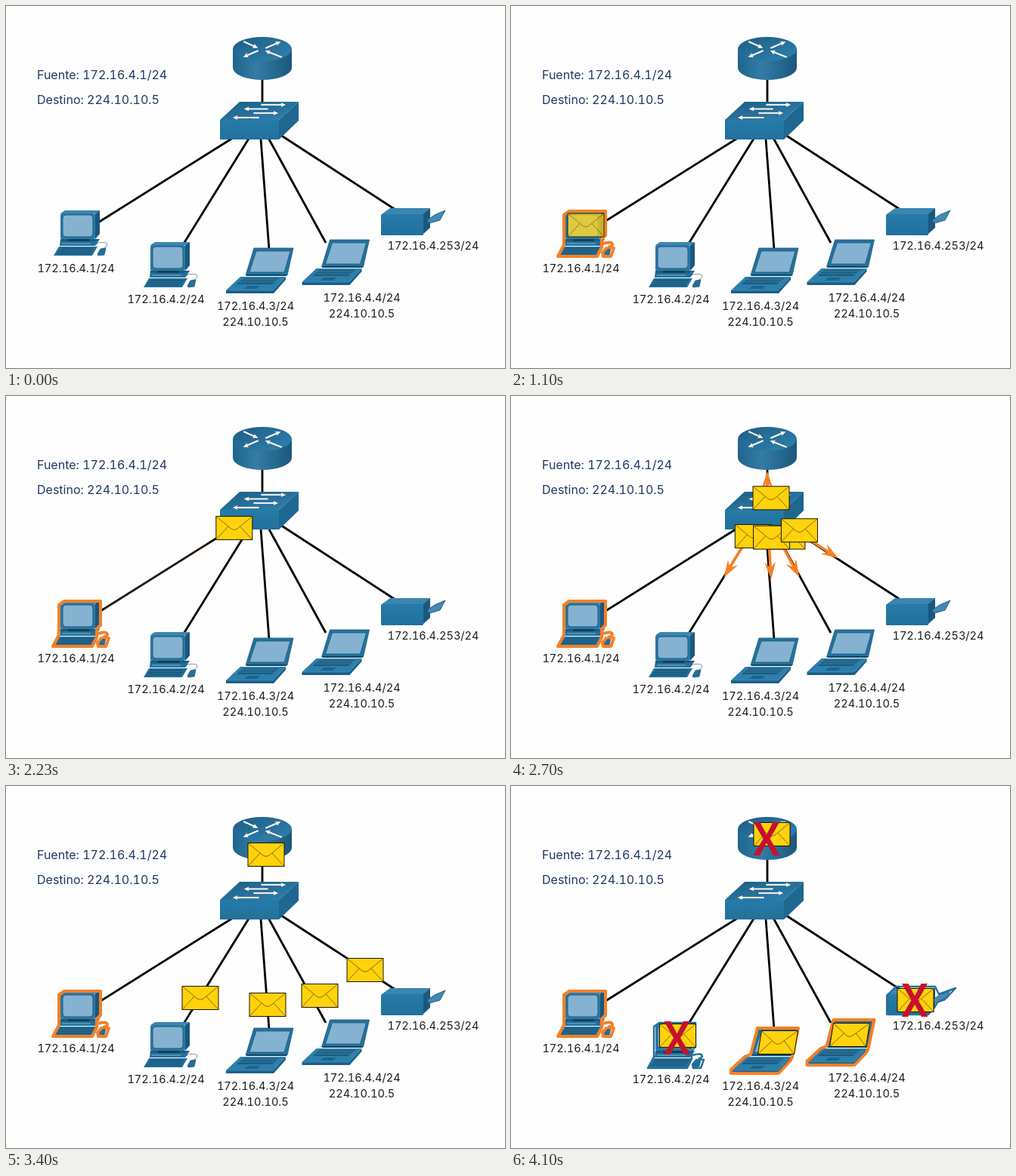
Animation, 660 px wide and 480 px high, one loop 4800 ms. Source, as an HTML page:

```html
<!DOCTYPE html>
<html lang="es">
<head>
<meta charset="utf-8">
<style>
html, body { margin: 0; width: 100%; height: 100%; overflow: hidden; background: #fefefe; }
svg { display: block; }
text { font: 14.6px Inter, Roboto, sans-serif; font-variant-numeric: tabular-nums; fill: #1c1c1c; text-anchor: middle; }
.title { font-size: 16px; fill: #1f3864; text-anchor: start; }
.glow { fill: none; stroke: #f58026; stroke-width: 4; stroke-linejoin: round; }
.blue { fill: none; stroke: #236f99; stroke-width: 2.4; stroke-linejoin: round; }
</style>
</head>
<body>
<svg width="660" height="480" viewBox="0 0 660 480">
<defs>
  <linearGradient id="side"><stop offset="0" stop-color="#1f658e"/><stop offset=".4" stop-color="#347ca5"/><stop offset="1" stop-color="#1b587c"/></linearGradient>
  <linearGradient id="top" x1="0" y1="0" x2="1" y2="1"><stop offset="0" stop-color="#1c5d84"/><stop offset="1" stop-color="#3083b0"/></linearGradient>
  <linearGradient id="face" x1="0" y1="0" x2="0" y2="1"><stop offset="0" stop-color="#267ba8"/><stop offset="1" stop-color="#22719c"/></linearGradient>

  <g id="pc">
    <path d="M72 309H124L118 318H71Z" fill="#1c5a80"/>
    <path d="M72 275L78 271H124L118 275Z" fill="#3b87b0"/>
    <path d="M118 275L124 271V302L118 309Z" fill="#1a587d"/>
    <rect x="72" y="275" width="46" height="34" rx="2" fill="#2a7aa6"/>
    <rect x="75" y="277" width="40" height="29" rx="4" fill="#86b2d1" stroke="#1c587c"/>
    <path d="M82 309H110V312H82Z" fill="#143f5a"/>
    <path d="M72 312H117L121 309V315L117 318H72Z" fill="#236f99"/>
    <path d="M74 315H112" stroke="#7fb0cc"/>
    <path d="M70 319H121L114 331H63Z" fill="#22709a"/>
    <path d="M71 322H116M69 325H114M67 328H112" stroke="#15496a"/>
    <path d="M121 314Q135 312 134 317Q133 320 128 322" fill="none" stroke="#3d4a52" stroke-width=".6"/>
    <path d="M121 329L125 322L132 321L130 330L122 331Z" fill="#236f99" stroke="#184f70" stroke-width=".7"/>
  </g>
  <g id="pcLine">
    <path d="M70 277L77 272H125V304L120 309V320L114 332H62L70 317Z"/>
    <path d="M121 315Q134 311 134 317L129 320L136 321L132 332H122L121 327L127 320"/>
  </g>

  <g id="laptop">
    <path d="M328 321H380L372 357H317Z" fill="#23729d" stroke="#195a80" stroke-width=".8"/>
    <path d="M331 325H376L368 353H322Z" fill="#86b2d1" stroke="#1c587c" stroke-width=".8"/>
    <path d="M310 359H370L353 377H291Z" fill="#2b7fab"/>
    <path d="M291 377H353L370 359V363L354 381H291Z" fill="#1b5f87"/>
    <path d="M314 361H361L352 369H305Z" fill="#1b5b80"/>
    <path d="M312 363H359M309 366H356M292 377H353L369 360" fill="none" stroke="#4a90b6" stroke-width=".7"/>
    <path d="M320 371H336L332 375H315Z" fill="#1d638b"/>
    <path d="M318 357H371" stroke="#134663" stroke-width="2"/>
  </g>
  <path id="laptopLine" d="M326 321H380L372 359L370 364L354 381H291V376L309 359L317 356Z"/>

  <g id="printer">
    <path d="M497 276L508 268H561L551 276Z" fill="#3986b0"/>
    <path d="M551 276L561 268V294L551 303Z" fill="#1a587d"/>
    <rect x="496" y="276" width="56" height="28" rx="1.5" fill="url(#face)"/>
    <path d="M557 284L567 277L581 271L574 284L560 288Z" fill="#4389b1" stroke="#1f648b"/>
  </g>
  <path id="printerLine" d="M498 277L509 266H561L566 276L588 268L576 281L564 287L560 294L552 303H498Z"/>

  <g id="mail">
    <rect x="-24" y="-15.5" width="48" height="31" fill="#ffd20c" stroke="#1b1500"/>
    <path d="M-24 -15.5L-4 1Q0 4 4 1L24 -15.5M-24 15.5L-8 -2M24 15.5L8 -2" fill="none" stroke="#6b5800" stroke-width=".8"/>
  </g>
  <path id="cross" d="M-17 -22H-8.5L0 -5.5L8.5 -22H17L4.5 0L17.5 22H9L0 5.5L-9 22H-17.5L-4.5 0Z" fill="#c8102e"/>
</defs>

<path d="M339 96V129M300 175L122 287M321 176L235 315M337 176L348 323M347 175L423 314M363 171L515 270" stroke="#000" stroke-width="2.8"/>

<path d="M300 57V82A39 16 0 0 0 378 82V57Z" fill="url(#side)"/>
<ellipse cx="339" cy="57" rx="39" ry="16" fill="url(#top)"/>
<path d="M283 151L309 127H387L361 151Z" fill="url(#top)"/>
<path d="M361 151L387 127V152L361 177Z" fill="#1e6790"/>
<path d="M283 151H361V177H283Z" fill="url(#face)"/>
<g id="signs" fill="#fff" stroke="#174d6e" stroke-width=".5"></g>

<use href="#pc"/>
<use href="#pc" x="119" y="42"/>
<use href="#laptop"/>
<use href="#laptop" x="100.5" y="-11"/>
<use href="#printer"/>
<use id="pcGlow" class="glow" href="#pcLine"/>
<g id="blue" class="blue">
  <use href="#pcLine" x="119" y="42"/>
  <use href="#printerLine"/>
</g>
<g id="lapGlow" class="glow">
  <use href="#laptopLine"/>
  <use href="#laptopLine" x="100.5" y="-11"/>
</g>

<g id="arrows"></g>
<g id="mails"></g>
<g id="crosses">
  <use href="#cross" x="338" y="70"/>
  <use href="#cross" x="219.5" y="334"/>
  <use href="#cross" x="534" y="284"/>
</g>

<text class="title" x="41" y="97">Fuente: 172.16.4.1/24</text>
<text class="title" x="41" y="130">Destino: 224.10.10.5</text>
<text x="92.5" y="353">172.16.4.1/24</text>
<text x="211.5" y="394">172.16.4.2/24</text>
<text x="330" y="403">172.16.4.3/24</text>
<text x="330" y="424">224.10.10.5</text>
<text x="470.5" y="392">172.16.4.4/24</text>
<text x="470.5" y="413">224.10.10.5</text>
<text x="565" y="323">172.16.4.253/24</text>
</svg>

<script>
const LOOP = 4800, HUB = [344, 154];
const $ = id => document.getElementById(id);
const clamp = v => Math.max(0, Math.min(1, v));
const mix = (a, b, k) => a.map((v, i) => v + (b[i] - v) * k);

function add(parent, tag, attrs = {}) {
  const el = document.createElementNS('http://www.w3.org/2000/svg', tag);
  for (const k in attrs) el.setAttribute(k, attrs[k]);
  return parent.appendChild(el);
}

// Arrow outline from a to b: shaft width w, head length h, half width s, notch n
function arrowPath(a, b, w, h, s, n) {
  const dx = b[0] - a[0], dy = b[1] - a[1], len = Math.hypot(dx, dy) || 1;
  const k = Math.min(1, len / h), c = dx / len, d = dy / len;
  const pts = [[0, w / 2], [len - n * k, w / 2], [len - h * k, s * k], [len, 0],
               [len - h * k, -s * k], [len - n * k, -w / 2], [0, -w / 2]];
  return 'M' + pts.map(([x, y]) => `${a[0] + x * c - y * d} ${a[1] + x * d + y * c}`).join('L') + 'Z';
}

for (const [x, y, u, v] of [
  [314, 47, 334, 56], [343, 56, 364, 47], [334, 59, 313, 68], [365, 68, 342, 59],
  [337, 131, 371, 131], [347, 136.5, 314, 136.5], [327, 142, 361, 142], [335, 148, 299, 148]
]) add($('signs'), 'path', { d: arrowPath([x, y], [u, v], 2.6, 8, 3.6, 7) });

// from/to: arrow ends; a, b, c: envelope stops; max: how far the arrow may grow
const routes = [
  { from: [339, 127], to: [339, 67], a: [344, 120], b: [344, 91], c: [345, 64], max: .65 },
  { from: [319, 178], to: [237, 315], a: [301, 212], b: [257, 281], c: [220.5, 331] },
  { from: [348, 178], to: [421, 314], a: [382, 215], b: [415, 278], c: [448, 330], skew: -9 },
  { from: [340, 177], to: [349, 322], a: [345, 215], b: [346, 290], c: [353, 340], skew: -9 },
  { from: [366, 172], to: [513, 267], a: [412, 198], b: [475, 244], c: [535, 284] }
];
const first = { from: [130, 282], to: [268, 195] };
for (const r of [first, ...routes]) {
  r.arrow = add($('arrows'), 'path');
  r.mail = add($('mails'), 'use', { href: '#mail' });
}

// Grows to u; fading turns pale first, then transparent
function drawArrow(r, u, fade) {
  const pale = clamp(fade * 2), rgb = mix([245, 128, 38], [250, 187, 143], pale);
  r.arrow.setAttribute('d', arrowPath(r.from, mix(r.from, r.to, u), 3.6, 23, 7.5, 17));
  r.arrow.setAttribute('fill', `rgb(${rgb.map(Math.round)})`);
  r.arrow.setAttribute('opacity', u > 0 ? clamp(2 - 2 * fade) : 0);
}

function drawMail(r, [x, y], opacity, skew = 0) {
  r.mail.setAttribute('transform', `translate(${x} ${y}) skewX(${skew})`);
  r.mail.setAttribute('opacity', opacity);
}

function draw(t) {
  const phase = (a, b) => clamp((t - a) / (b - a));
  const show = phase(730, 1230), send = phase(1260, 1760), enter = phase(1800, 2260);
  const split = phase(2330, 2830), run = phase(2900, 3400), land = phase(3460, 3960);
  const verdict = phase(3970, 4090), settle = clamp(land * 2 - 1);
  const arrive = 1 - (1 - land) ** 2.4;

  $('pcGlow').setAttribute('opacity', clamp(show * 1.35));
  $('blue').setAttribute('opacity', settle);
  $('lapGlow').setAttribute('opacity', verdict);
  $('crosses').setAttribute('opacity', verdict);

  drawArrow(first, send, enter);
  const pos = enter > 0 ? mix([195, 236], [309, 171], enter) : mix([99, 290.5], [195, 236], send);
  drawMail(first, pos, t < 2330 ? show : 0);

  for (const r of routes) {
    const grown = run > 0 ? Math.min(1, .735 + .55 * run) : .735 * split ** 1.6;
    drawArrow(r, Math.min(grown, r.max || 1), run);
    const p = land > 0 ? mix(r.b, r.c, arrive)
      : run > 0 ? mix(r.a, r.b, run) : mix(HUB, r.a, split ** 2);
    drawMail(r, p, t < 2330 ? 0 : 1, (r.skew || 0) * settle);
  }
}

const start = performance.now();
function tick() {
  draw((performance.now() - start) % LOOP);
  requestAnimationFrame(tick);
}
tick();
</script>
</body>
</html>
```
